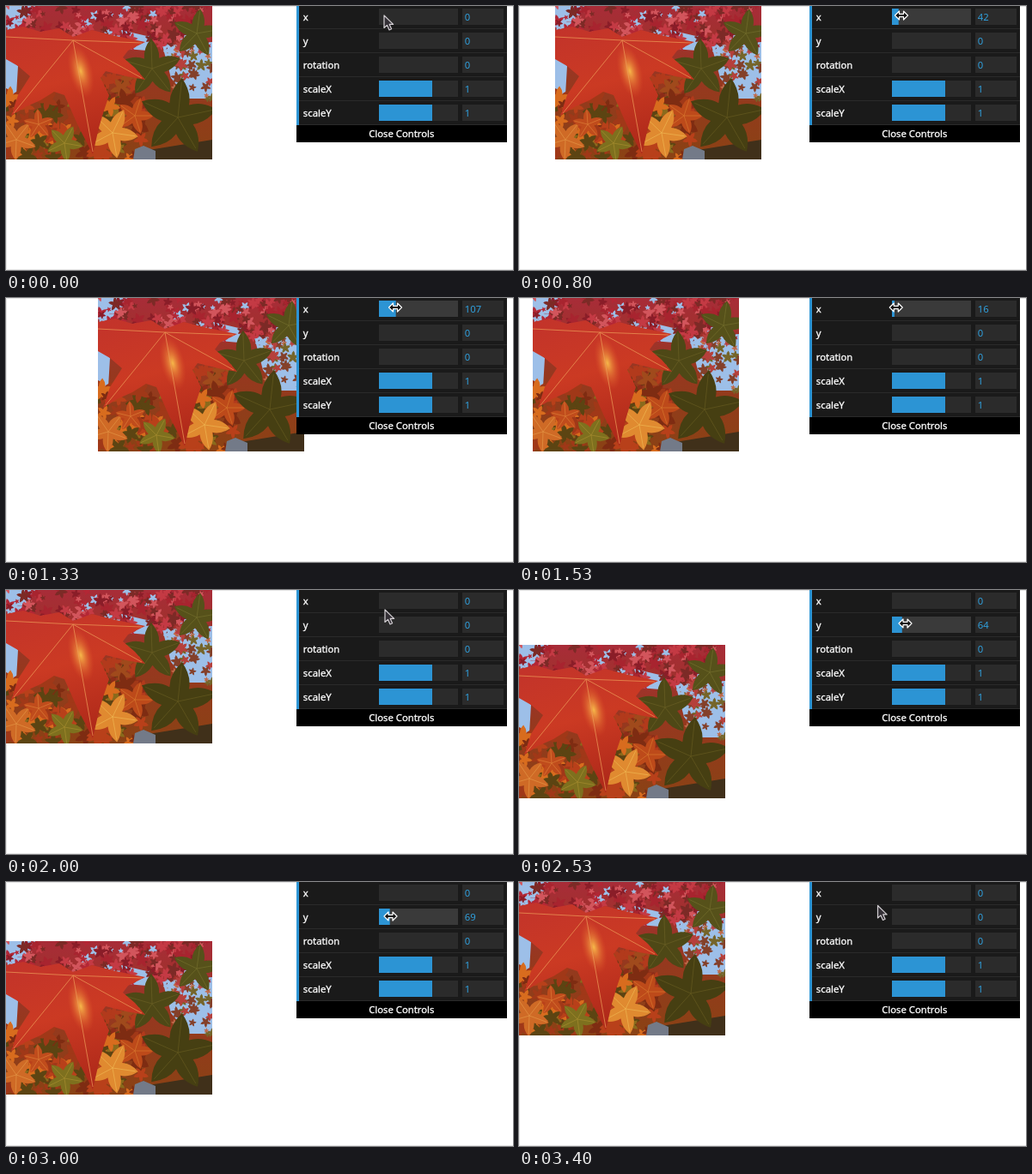
These frames come from a looping animation (590 px wide and 308 px high, 3600 ms). An HTML page:

```html
<!DOCTYPE html>
<html lang="en">
<head>
<meta charset="utf-8">
<title>Transform controls</title>
<style>
  html, body { margin: 0; width: 100%; height: 100%; overflow: hidden; background: #fff; }
  svg { display: block; width: 590px; height: 308px; }
  text { font: 11.3px "Noto Sans", "Open Sans", sans-serif; fill: #fff; stroke: #fff; stroke-width: .3px; }
  .num { fill: #2f9fdc; stroke: none; }
</style>
</head>
<body>
<svg id="stage" viewBox="0 0 590 308">
  <defs>
    <clipPath id="crop"><rect width="240" height="179"/></clipPath>
    <linearGradient id="base" x2="0" y2="1">
      <stop offset="0" stop-color="#a82c38"/>
      <stop offset=".5" stop-color="#96381f"/>
      <stop offset="1" stop-color="#8a4214"/>
    </linearGradient>
    <linearGradient id="red" x2=".3" y2="1">
      <stop offset="0" stop-color="#c2332b"/>
      <stop offset=".5" stop-color="#cb3a23"/>
      <stop offset="1" stop-color="#b02a1a"/>
    </linearGradient>
    <radialGradient id="glow">
      <stop offset="0" stop-color="#f6b84a"/>
      <stop offset="1" stop-color="#e0552a" stop-opacity="0"/>
    </radialGradient>
  </defs>
  <path d="M590 .5H.5V307.5H590" fill="none" stroke="#e6e6e6"/>
  <g id="photo"><g id="art" clip-path="url(#crop)"></g></g>
  <g id="panel"></g>
  <path id="arrow" d="M0 0V14.5L3.5 11.4L6 17L8.6 15.8L6.2 10.4H10.6Z"
    fill="#343036" stroke="#d4d0d4" stroke-width="1.2" stroke-linejoin="round"/>
  <path id="resize" d="M-7.5 0L-2.5 -5V-1.7H2.5V-5L7.5 0L2.5 5V1.7H-2.5V5Z"
    fill="#111" stroke="#fff" stroke-width="1.2" stroke-linejoin="round"/>
</svg>
<script>
const $ = id => document.getElementById(id);

function add(parent, tag, attrs, text) {
  const el = document.createElementNS('http://www.w3.org/2000/svg', tag);
  for (const name in attrs) el.setAttribute(name, attrs[name]);
  if (text !== undefined) el.textContent = text;
  parent.append(el);
  return el;
}

const rect = (parent, x, y, width, height, fill) =>
  add(parent, 'rect', { x, y, width, height, fill });

// Foliage picture
let seed = 11;
const rnd = () => (seed = seed * 16807 % 2147483647) / 2147483647;
const pick = list => list[Math.floor(rnd() * list.length)];

// Five curved lobes with optional veins
function leaf(x, y, r, turn, fill, vein) {
  const polar = (deg, len) => {
    const a = (turn + deg) * Math.PI / 180;
    return `${(x + Math.cos(a) * len * r).toFixed(1)} ${(y + Math.sin(a) * len * r).toFixed(1)} `;
  };
  let d = 'M' + polar(-36, .42), veins = '';
  for (let deg = 0; deg < 360; deg += 72) {
    d += `Q${polar(deg - 22, .74)}${polar(deg, 1)}Q${polar(deg + 22, .74)}${polar(deg + 36, .42)}`;
    veins += `M${x} ${y}L${polar(deg, .9)}`;
  }
  add($('art'), 'path', { d: d + 'Z', fill });
  if (vein) add($('art'), 'path', { d: veins, stroke: vein, 'stroke-width': .7, opacity: .6 });
}

function scatter(count, x, y, w, h, size, colors) {
  while (count--) leaf(x + rnd() * w, y + rnd() * h, size * (.5 + rnd()), rnd() * 72, pick(colors));
}

function paintPhoto() {
  const art = $('art');
  const shape = (d, fill) => add(art, 'path', { d, fill });
  const sky = '#9dbfe8';
  rect(art, 0, 0, 240, 179, 'url(#base)');
  shape('M0 0H36L26 14L10 24H0ZM0 58L14 70L12 104L0 112ZM134 28L168 36L164 52L140 50ZM182 46L240 42V108H212L192 84Z', sky);
  scatter(170, 0, -2, 240, 52, 6, ['#b32735', '#c43a44', '#8a1d28', '#d2555c', '#a8242f', '#7c2a26', '#9dbfe8']);
  scatter(50, 188, 46, 52, 62, 6, ['#b5403c', '#84402a', '#9dbfe8', '#75652a', '#c06a4a']);
  scatter(30, 100, 76, 66, 46, 9, ['#8c2c18', '#b23a1c', '#6a3a14', '#a04a1c']);
  scatter(80, 0, 108, 160, 70, 11, ['#b8401a', '#d86c1e', '#7e2c12', '#8a6a1c', '#5c4412', '#a03818']);
  shape('M166 168L240 156V179H160Z', '#40301a');
  shape('M150 167L160 163L174 169V179H148Z', '#737a88');
  leaf(12, 156, 24, 20, '#cf6a26', '#f1b25a');
  leaf(38, 138, 18, 50, '#c04c1c', '#efa04a');
  leaf(68, 160, 22, 10, '#7e701e', '#c0a03c');
  leaf(150, 128, 22, 0, '#bd4a1a', '#e8963c');
  leaf(124, 148, 30, -64, '#e08a30', '#f8d468');
  leaf(222, 32, 29, -82, '#56511a', '#87823a');
  leaf(170, 73, 35, -20, '#4e4816', '#7d7030');
  leaf(200, 130, 46, -12, '#463f12', '#7a6c2a');
  shape('M0 28L20 24L40 30L62 26L78 36L100 28L128 35L162 42L142 52L136 60L150 72L162 86L140 82L116 76L110 84L120 104L114 122L108 142L101 173L84 140L68 104L56 100L40 110L22 118L6 128L14 104L28 82L14 70L0 62Z', 'url(#red)');
  add(art, 'ellipse', { cx: 87, cy: 76, rx: 14, ry: 32, fill: 'url(#glow)', transform: 'rotate(-14 87 76)' });
  add(art, 'path', {
    d: 'M78 40L101 170M78 40L158 84M78 40L9 125M78 40L0 36M78 40L158 43',
    stroke: '#ee9c58', 'stroke-width': .9, opacity: .8
  });
}

// Control panel
const LEFT = 434, TRACK = 92, MAX = 500;

function buildPanel() {
  const panel = $('panel');
  rect(panel, 338, 0, 245, 139, '#1a1a1a');
  const rows = ['x', 'y', 'rotation', 'scaleX', 'scaleY'].map((name, i) => {
    const y = i * 28, scale = i > 2;
    rect(panel, 338, y + 26, 245, 1, '#2a2a2a');
    add(panel, 'text', { x: 345.8, y: y + 17.2 }, name);
    const track = rect(panel, LEFT, y + 3, TRACK, 19, '#2b2b2b');
    const fill = rect(panel, LEFT, y + 3, scale ? 62 : 0, 19, '#2c94d4');
    rect(panel, 531, y + 3, 48, 19, '#2b2b2b');
    const num = add(panel, 'text', { x: 533.8, y: y + 17.4, class: 'num' }, scale ? 1 : 0);
    return { track, fill, num };
  });
  rect(panel, 338, 0, 3, 139, '#2c94d4');
  rect(panel, 338, 139, 245, 20, '#000');
  add(panel, 'text', { x: 460.3, y: 153.2, 'text-anchor': 'middle' }, 'Close Controls');
  return rows;
}

paintPhoto();
const rows = buildPanel();

// Tables of [step, value...], 15 steps per second
const LOOP = 3600, STEPS = 54;
const xKeys = [[9, 0], [10, 12], [12, 42], [14, 72], [16, 97], [17, 108], [18, 114], [19, 113], [20, 107], [21, 82], [23, 16], [24, 0]];
const yKeys = [[34, 0], [35, 8], [36, 25], [38, 64], [40, 97], [41, 106], [42, 107], [43, 101], [44, 88], [45, 69], [47, 17], [48, 0]];
const dragKeys = [[2, 444, 11], [8, 441, 11], [12, 445, 11], [17, 455, 11], [20, 453, 11], [24, 434, 11], [27, 440, 14],
  [32, 442, 38], [34, 436, 39], [38, 449.5, 39], [41, 454, 40], [45, 447.5, 40], [48, 433, 40]];
const arrowKeys = [[0, 440, 11], [1, 440, 11], [28, 441, 17], [30, 441, 23], [31, 441, 30], [49, 427, 36], [51, 417.5, 27.5], [53, 417.5, 27.5]];

function at(keys, step, col = 1) {
  if (step <= keys[0][0]) return keys[0][col];
  for (let i = 1; i < keys.length; i++) {
    const a = keys[i - 1], b = keys[i];
    if (step <= b[0]) return a[col] + (b[col] - a[col]) * (step - a[0]) / (b[0] - a[0]);
  }
  return keys[keys.length - 1][col];
}

const within = (step, from, to) => step >= from && step <= to;

function setRow(row, value, lit) {
  row.fill.setAttribute('width', value / MAX * TRACK);
  row.track.setAttribute('fill', lit ? '#3a3a3a' : '#2b2b2b');
  row.num.textContent = value;
}

function place(id, keys, step, shown) {
  $(id).setAttribute('transform', `translate(${at(keys, step, 1)} ${at(keys, step, 2)})`);
  $(id).setAttribute('visibility', shown ? 'visible' : 'hidden');
}

function draw(time) {
  const step = Math.floor((time % LOOP + 3.4) * 15 / 1000) % STEPS;
  const x = Math.round(at(xKeys, step)), y = Math.round(at(yKeys, step));
  const dragging = within(step, 2, 27) || within(step, 32, 48);
  $('photo').setAttribute('transform', `translate(${x} ${y})`);
  setRow(rows[0], x, within(step, 9, 27));
  setRow(rows[1], y, within(step, 33, 48));
  place('resize', dragKeys, step, dragging);
  place('arrow', arrowKeys, step, !dragging);
}

const start = performance.now();
function tick() {
  draw(performance.now() - start);
  requestAnimationFrame(tick);
}
tick();
</script>
</body>
</html>
```
